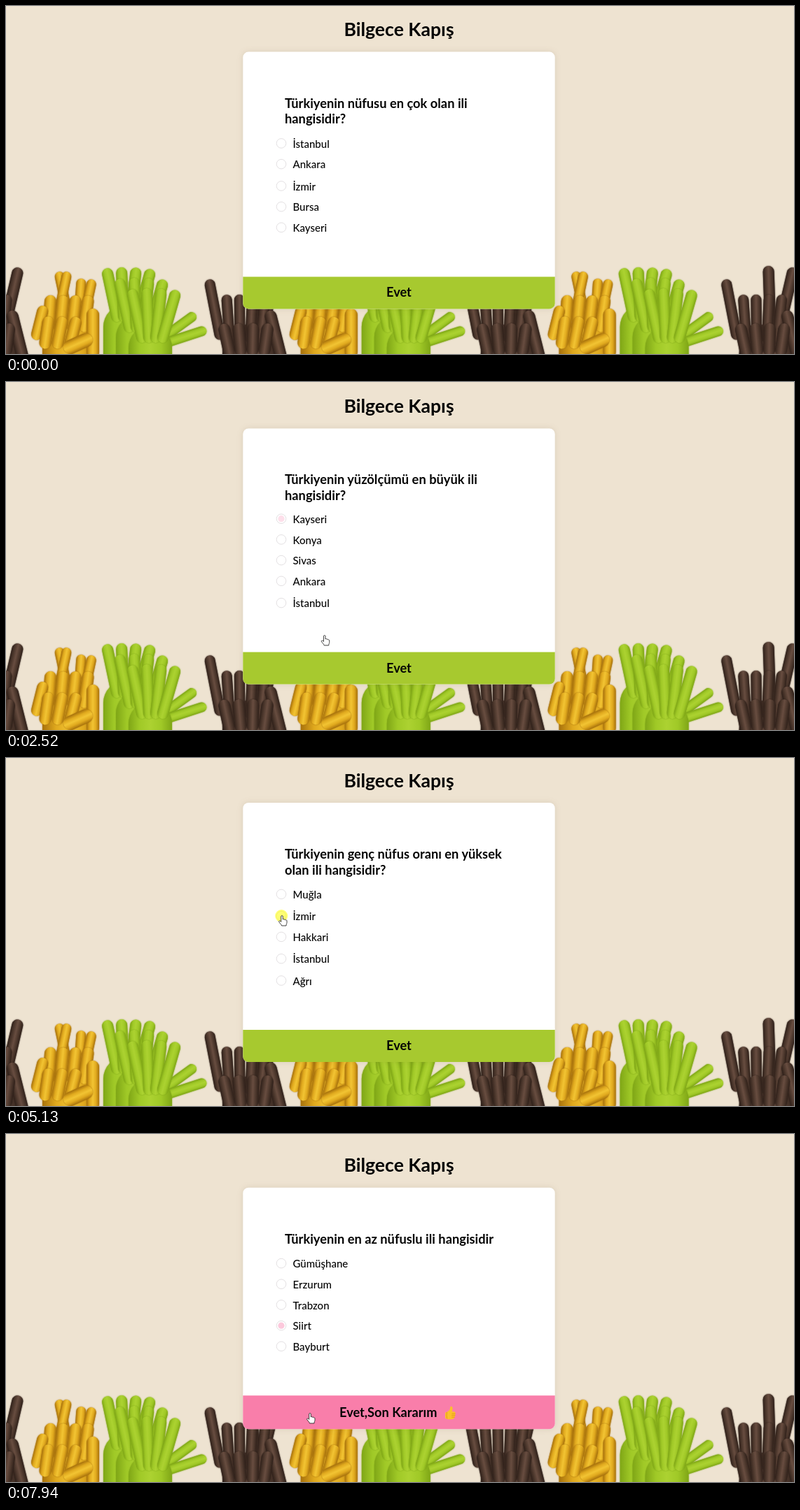
Write an HTML page with a canvas that moves like this. It is 1125x498 px and loops after 8 s.

```html
<!DOCTYPE html>
<html lang="tr">
<head>
<meta charset="utf-8">
<title>Bilgece Kapış</title>
<style>
  html, body { margin: 0; width: 100%; height: 100%; overflow: hidden; background: #eee3d1; }
  canvas, svg { position: absolute; left: 0; top: 0; width: 1125px; height: 498px; }
  text { font-family: Lato, "Open Sans", sans-serif; fill: #050505; }
  .title { font-size: 26.6px; font-weight: 700; text-anchor: middle; }
  .head { font-size: 18.3px; font-weight: 700; }
  .option { font-size: 15px; font-weight: 500; }
  .label { font-size: 18.2px; font-weight: 700; }
  .card { filter: drop-shadow(0 0 4px rgba(90, 70, 40, .13)); }
  .ring { fill: #fff; stroke: #e3e0e2; }
</style>
</head>
<body>
<canvas id="hands" width="1125" height="498"></canvas>
<svg viewBox="0 0 1125 498">
  <text id="title" class="title" x="561">Bilgece Kapış</text>
  <g class="card">
    <rect id="card" x="338.3" width="445.4" rx="8" fill="#fff"/>
    <path id="button"/>
  </g>
  <text id="head1" class="head" x="398"></text>
  <text id="head2" class="head" x="398"></text>
  <g id="options"></g>
  <circle id="dot" cx="393" r="4.6" fill="#f87ba8"/>
  <text id="label" class="label"></text>
  <g id="thumb">
    <path d="M-7 0Q-7-1-5-1.3L-2-3.2Q.4-5.4.2-8.3Q.6-10 2.3-9.4Q4.4-8.3 3.2-4.4L2.9-2.2H6Q7.7-1.8 7.4 0Q8.2 1.5 7 2.7Q7.6 4.3 6.3 5.3Q6.6 7 5 7.6Q4.6 9 2.8 9H-2Q-4 9-5.4 7.8L-7 7.6Z" fill="#fbc02d"/>
    <path d="M7.2.8H2.8M7 3.3H2.6M6.3 5.8H2.6M-4.6-1Q-5.4 3-4.4 7.6" fill="none" stroke="#e59a1d" stroke-linecap="round"/>
  </g>
  <circle id="press" r="9" fill="#ff0" opacity=".55"/>
  <path id="cursor" fill="#fff" stroke="#2a2a2a" stroke-width=".9" stroke-linejoin="round"
    d="M-1.3.8C-1.3-.8 1.3-.8 1.3.8V5C2 4.2 3.3 4.5 3.5 5.4C4.3 4.8 5.2 5.2 5.4 6C6.3 5.6 7 6.2 7 7.2V9.5C7 11 6 11.8 6 14H-.5C-.8 12.3-3 10.5-4.3 8.6C-5 7.4-3.4 6.5-2.4 7.4L-1.3 8.5Z"/>
</svg>
<script>
const $ = id => document.getElementById(id);
const LOOP = 8000, FADE = 120, HOLD = 130, ENTER = 190;

// Hands: rows of finger capsules, shaded dark, base, light
const TILE = 368.8;
const GREEN = ['#7fa616', '#a0c927', '#acd231'];
const YELLOW = ['#a8720c', '#e0a91e', '#f2c433'];
const BROWN = ['#30211a', '#4d382d', '#684d40'];
const ctx = $('hands').getContext('2d');

// Fingers grow up from (x, y), each `gap` further on, turning from angle `a` to `b` degrees
function fingers(tone, x, y, len, w, a, b = a, n = 1, gap = 0) {
  for (let i = 0; i < n; i++) {
    ctx.save();
    ctx.translate(x + i * gap, y);
    ctx.rotate((a + (b - a) * i / Math.max(1, n - 1)) * Math.PI / 180);
    const g = ctx.createLinearGradient(-w / 2, 0, w / 2, 0);
    [0, 1, 2, 1, 0].forEach((k, j) => g.addColorStop(j / 4, tone[k]));
    ctx.fillStyle = g;
    ctx.shadowColor = tone[0];
    ctx.shadowBlur = 2;
    ctx.beginPath();
    ctx.roundRect(-w / 2, -len, w, len + w / 2, w / 2);
    ctx.fill();
    ctx.restore();
  }
}

function brownHand() {
  fingers(BROWN, 305, 470, 80, 15, -11);
  fingers(BROWN, 354, 465, 93, 16, -2, 13, 2, 12);
  fingers(BROWN, 352, 530, 75, 86, 0);
  fingers(BROWN, 319, 475, 62, 15, -4, 6, 4, 15);
  fingers(BROWN, 392, 500, 66, 17, -14);
  fingers(BROWN, 318, 492, 38, 17, -12, 8, 4, 17);
}

function yellowHand() {
  fingers(YELLOW, 89, 445, 66, 14, -12, 12, 2, -15);
  fingers(YELLOW, 103, 458, 68, 14, 4, 12, 2, 6);
  fingers(YELLOW, 91, 530, 82, 78, 0);
  fingers(YELLOW, 61, 458, 44, 17, 4, 8, 4, 17);
  fingers(YELLOW, 124, 495, 62, 18, 0);
  fingers(YELLOW, 44, 470, 42, 16, 14);
  fingers(YELLOW, 56, 482, 38, 17, 8, 14, 3, 18);
  fingers(YELLOW, 92, 488, 34, 20, 66);
}

function greenHand() {
  for (let back = 2; back >= 0; back--) {
    const x = 206 - 18 * back, y = 488 - 15 * back;
    if (!back) fingers(GREEN, x, y, 80, 14, 54, 72, 2, 4);
    fingers(GREEN, x, y + 60, 90, 62, 0);
    fingers(GREEN, x - 12, y - 14, 70, 16, -12, 16, 4, 10);
  }
}

function drawHands() {
  for (let k = -1; k < 3; k++) {
    ctx.setTransform(1, 0, 0, 1, k * TILE, 0);
    brownHand();
    yellowHand();
    greenHand();
  }
}

// Each screen: picked row, then when and where the cursor picks and confirms
const SCREENS = [
  { head: ['Türkiyenin nüfusu en çok olan ili', 'hangisidir?'],
    options: ['İstanbul', 'Ankara', 'İzmir', 'Bursa', 'Kayseri'],
    row: 0, pick: { t: 1330, x: 441, y: 197 }, confirm: { t: 2300, x: 482, y: 411 } },
  { head: ['Türkiyenin yüzölçümü en büyük ili', 'hangisidir?'],
    options: ['Kayseri', 'Konya', 'Sivas', 'Ankara', 'İstanbul'],
    row: 2, pick: { t: 3200, x: 394, y: 256 }, confirm: { t: 4060, x: 441, y: 408 } },
  { head: ['Türkiyenin genç nüfus oranı en yüksek', 'olan ili hangisidir?'],
    options: ['Muğla', 'İzmir', 'Hakkari', 'İstanbul', 'Ağrı'],
    row: 1, pick: { t: 5130, x: 394, y: 226 }, confirm: { t: 6010, x: 434, y: 414 } },
  { head: ['Türkiyenin en kuzeyindeki il hangisidir?'],
    options: ['Mersin', 'Edirne', 'Iğdır', 'Sinop', 'Artvin'],
    row: 3, pick: { t: 6890, x: 397, y: 270 }, confirm: { t: 7740, x: 434, y: 400 } },
  { head: ['Türkiyenin en az nüfuslu ili hangisidir'],
    options: ['Gümüşhane', 'Erzurum', 'Trabzon', 'Siirt', 'Bayburt'], row: 3 }
];
const ROUNDS = SCREENS.filter(s => s.pick);
const CLICKS = ROUNDS.flatMap(s => [
  { ...s.pick, arrive: s.pick.t - 140, leave: s.pick.t + 200 },
  { ...s.confirm, arrive: s.confirm.t - 240, leave: s.confirm.t + 150 }
]);
const OUTSIDE = { x: 1034, y: 473, leave: ENTER };

const clamp = v => Math.max(0, Math.min(1, v));
const set = (el, attrs) => { for (const k in attrs) el.setAttribute(k, attrs[k]); };
const show = on => on ? 'visible' : 'hidden';
const startOf = n => n ? SCREENS[n - 1].confirm.t + HOLD : 0;

const rows = SCREENS[0].options.map(() => {
  const make = (tag, attrs) => {
    const el = document.createElementNS('http://www.w3.org/2000/svg', tag);
    set(el, attrs);
    return $('options').appendChild(el);
  };
  return {
    ring: make('circle', { class: 'ring', cx: 393, r: 6.8 }),
    text: make('text', { class: 'option', x: 409.5 })
  };
});

function cursorAt(t) {
  const i = CLICKS.findLastIndex(c => t >= c.leave);
  const a = CLICKS[i] || OUTSIDE, b = CLICKS[i + 1] || a;
  const p = clamp((t - a.leave) / (b.arrive - a.leave) || 0), e = 1 - (1 - p) ** 3;
  return [a.x + (b.x - a.x) * e, a.y + (b.y - a.y) * e];
}

function render(t) {
  const n = SCREENS.findLastIndex((s, i) => t >= startOf(i)), s = SCREENS[n], from = startOf(n);
  const [cx, cy] = cursorAt(t);

  // The button reacts shortly before the click, until the cursor leaves it
  const since = Math.min(...ROUNDS.map(r => t - r.confirm.t + 110).filter(d => d >= 0));
  const hover = since < 370 && cy > 380;

  // Rows with tall or deep accents are slightly higher
  const extra = o => /[İğş]/.test(o) ? 1.6 : 0;
  const twoLines = s.head.length > 1;
  const h = s.options.reduce((sum, o) => sum + extra(o), twoLines ? 364.6 : 342.1) + (hover ? 2 : 0);
  const top = 249.5 - h / 2, bottom = top + h, btn = bottom - (hover ? 48 : 46);

  set($('title'), { y: top - 22.5 });
  set($('card'), { y: top, height: h });
  const k = hover ? clamp(since / FADE) : 0;
  const mix = [[167, 249], [201, 126], [47, 170]].map(([a, b]) => Math.round(a + (b - a) * k));
  set($('button'), {
    d: `M338.3 ${btn}H783.7V${bottom - 8}a8 8 0 0 1-8 8H346.3a8 8 0 0 1-8-8Z`, fill: `rgb(${mix})`
  });
  set($('head1'), { y: top + 80 });
  set($('head2'), { y: top + 102.5 });
  $('head1').textContent = s.head[0];
  $('head2').textContent = s.head[1] || '';

  let y = top + (twoLines ? 130.5 : 108);
  rows.forEach((row, i) => {
    y += extra(s.options[i]);
    set(row.ring, { cy: y - 1.2 });
    set(row.text, { y: y + 5 });
    row.text.textContent = s.options[i];
    y += 29.7;
  });

  // The previous choice fades out on its own row
  const fading = n > 0 && t - from < FADE;
  const dotRow = rows[SCREENS[fading ? n - 1 : n].row];
  const picked = s.pick ? clamp((t - s.pick.t - HOLD) / FADE) : 0;
  set($('dot'), {
    cy: dotRow.ring.getAttribute('cy'),
    opacity: fading ? 1 - (t - from) / FADE : picked
  });

  $('label').textContent = hover ? 'Evet,Son Kararım' : 'Evet';
  set($('label'), { x: hover ? 476 : 543, y: btn + (hover ? 30.5 : 29) });
  set($('thumb'), { transform: `translate(634 ${btn + 25})`, visibility: show(hover) });

  const pressed = CLICKS.some(c => t >= c.t && t < c.t + HOLD);
  set($('cursor'), { transform: `translate(${cx} ${cy})`, visibility: show(t >= ENTER) });
  set($('press'), { cx: cx - .8, cy, visibility: show(pressed) });
}

drawHands();
const start = performance.now();
function tick() {
  render((performance.now() - start) % LOOP);
  requestAnimationFrame(tick);
}
tick();
</script>
</body>
</html>
```
